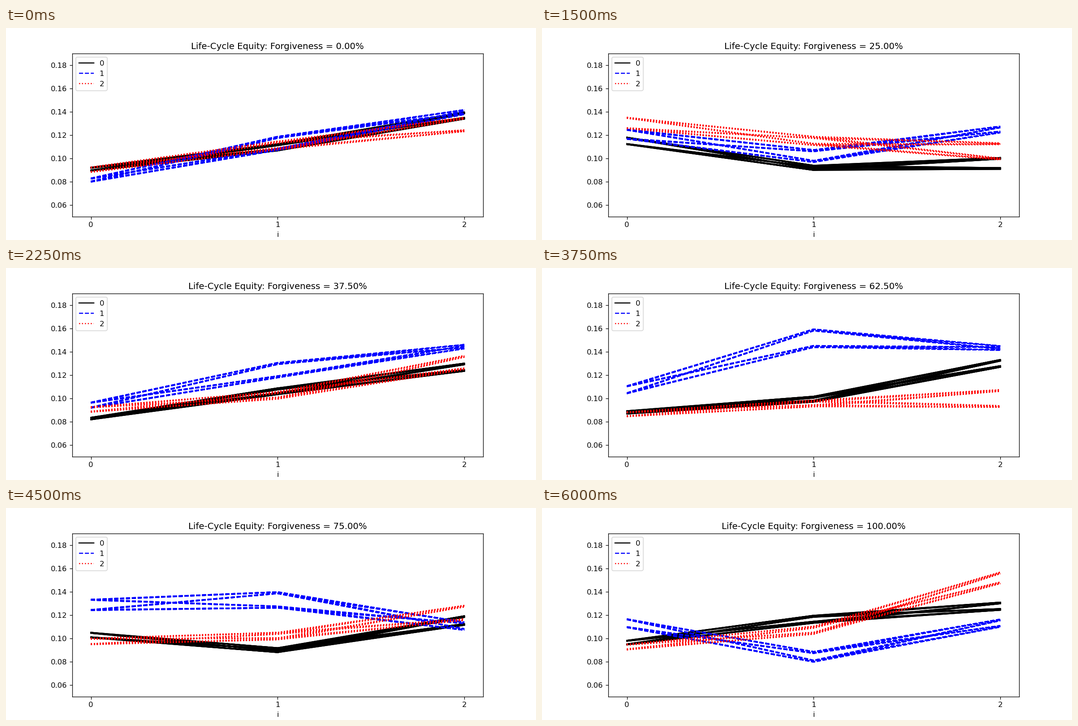
A matplotlib script for the animation above (6.75 s loop, 1183x473 px).

```python
import itertools

import matplotlib.pyplot as plt
import numpy as np
from matplotlib.animation import FuncAnimation

WIDTH, HEIGHT, DPI = 1183, 473, 118.3
FRAMES, INTERVAL = 9, 750
AGES = range(3)
STYLES = ("k-", "b--", "r:")

# Mean equity in thousandths at ages 0, 1, 2 for each of the three groups;
# steps in between are blended.
KEYS = {
    0: [(90.8, 109.5, 136.7), (81.4, 112.9, 139.7), (90.3, 111.1, 129.1)],
    2: [(115.0, 91.9, 95.7), (120.7, 102.0, 124.8), (130.3, 115.0, 106.0)],
    3: [(82.7, 106.1, 126.7), (94.2, 124.2, 144.4), (90.5, 102.6, 130.7)],
    5: [(88.0, 99.3, 130.0), (107.4, 151.6, 143.2), (86.4, 95.7, 99.9)],
    6: [(102.8, 89.9, 115.3), (128.7, 133.0, 110.5), (97.4, 102.0, 121.9)],
    8: [(96.4, 116.4, 127.6), (113.0, 84.2, 113.1), (92.6, 107.0, 151.9)],
}

# Gap between good and bad shocks: widens with equity when young,
# narrows with it when old.
GAP = np.array([(5.5, 5.0, 6.8), (7.0, 10.5, 5.3), (7.0, 6.0, 12.2)])
GAIN = np.array([.13, .10, -.10])
TYPICAL = 115

# How strongly the two shocks before still show at each age
ECHO = np.array([.5, 1.1, .9])
FADE = .4

# Each path holds two past shocks, then those at ages 0, 1, 2.
PATHS = np.array(list(itertools.product((-.5, .5), repeat=5)))


def mean_equity(step):
    before = max(k for k in KEYS if k <= step)
    after = min(k for k in KEYS if k >= step)
    mix = (step - before) / max(after - before, 1)
    return (1 - mix) * np.array(KEYS[before]) + mix * np.array(KEYS[after])


def life_cycles(mean, gap):
    now, last, older = PATHS[:, 2:], PATHS[:, 1:4], PATHS[:, :3]
    return (mean + gap * now + ECHO * (last + FADE * older)) / 1000


# The small margin keeps the pixel size from rounding down.
fig, ax = plt.subplots(
    figsize=((WIDTH + 1e-6) / DPI, (HEIGHT + 1e-6) / DPI), dpi=DPI)
ax.set_xlim(-.1, 2.1)
ax.set_ylim(.05, .19)
ax.set_xticks(AGES)
ax.set_xlabel("i")
title = ax.set_title("")

groups = [[ax.plot(AGES, [0] * 3, style)[0] for _ in PATHS]
          for style in STYLES]
ax.legend([lines[0] for lines in groups], ["0", "1", "2"], loc="upper left")


def update(step):
    title.set_text(f"Life-Cycle Equity: Forgiveness = {step / (FRAMES - 1):.2%}")
    means = mean_equity(step)
    gaps = np.maximum(GAP + GAIN * (means - TYPICAL), 1)
    for lines, mean, gap in zip(groups, means, gaps):
        for line, cycle in zip(lines, life_cycles(mean, gap)):
            line.set_ydata(cycle)
    return [title, *itertools.chain(*groups)]


anim = FuncAnimation(fig, update, frames=FRAMES, interval=INTERVAL,
                     repeat=True, repeat_delay=0)
plt.show()
```
